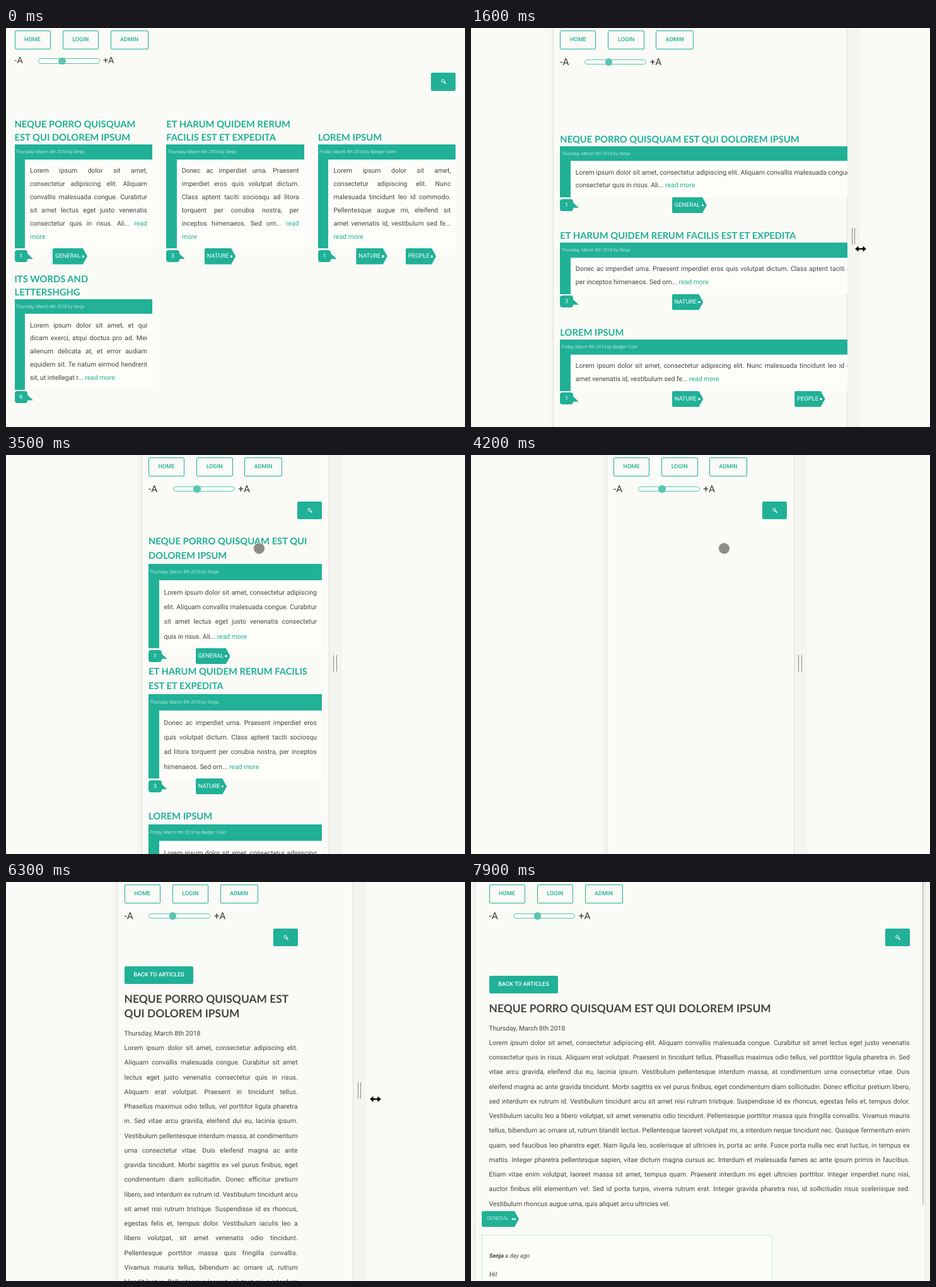
Recreate the animation shown at these times as an HTML page. Size 728 by 634 pixels, loop 8 s.

```html
<!DOCTYPE html>
<html lang="en">
<head>
<meta charset="utf-8">
<title>Responsive blog</title>
<style>
:root { --teal: #20b196; --bg: #fafaf6; --card: #fdfefa; }
html, body { margin: 0; width: 100%; height: 100%; overflow: hidden; background: var(--bg); }
#stage { position: relative; width: 728px; height: 634px; overflow: hidden; background: var(--bg);
  font: 10.49px Roboto, sans-serif; color: #444; text-rendering: geometricPrecision; }
#stage div, #stage svg { position: absolute; box-sizing: border-box; }
p, h1, h2 { margin: 0; }
.text { text-align: justify; }
.text span { color: var(--teal); }
h1, h2 { font-family: Lato, sans-serif; font-weight: 700; text-transform: uppercase; }
h2 { position: absolute; font-size: 14.75px; color: var(--teal); }
h1 { font-size: 17.4px; line-height: 23.25px; margin-bottom: 8.3px; }
.fill { background: var(--teal); }
.date { font-size: 7.32px; font-style: italic; font-weight: 300; color: #fff; padding-left: 2px; white-space: nowrap; }
.button { border: 1px solid var(--teal); border-radius: 2px; color: var(--teal);
  font-size: 9.1px; font-weight: 500; text-align: center; }
.button.fill { color: #fff; }
.label { color: #333; white-space: nowrap; line-height: 20px; }
.track { border: 1px solid #57c4b0; border-radius: 4px; background: var(--card); }
.thumb { border-radius: 50%; background: #5cc4b2; }
.bubble { border-radius: 4px; color: #fff; font-size: 9.2px; line-height: 19px; text-align: center; }
.tail { clip-path: polygon(0 0, 100% 100%, 0 100%); }
.tag { height: 25.5px; padding: 0 10.5px 0 4px; border-radius: 2px; background: var(--teal); color: #fff;
  font-size: 9.35px; line-height: 25.5px; white-space: nowrap;
  clip-path: polygon(0 0, calc(100% - 7px) 0, 100% 50%, calc(100% - 7px) 100%, 0 100%); }
.tag::after { content: ""; position: absolute; right: 4.8px; top: 11px; width: 3.6px; height: 3.6px;
  border-radius: 50%; background: #fff; }
#stage .post .tag { position: relative; display: block; width: 59px; margin-left: -11.5px;
  padding: 0 0 0 8px; font-size: 8.2px; font-weight: 300; }
.post .tag::after { box-shadow: -3.5px 0 #fff; }
.post { line-height: 23.25px; }
#stage .comment { position: relative; width: 460.5px; height: 130px; margin: 13px 0 0 -11.5px; padding: 20px 11px;
  border: 1px solid #c9e8e2; background: #fcfdf9; }
.comment p { margin-bottom: 5px; }
.comment i { font-size: 9.4px; }
.device { background: var(--bg); border: solid #dededb; border-width: 0 1px; box-shadow: 0 0 14px rgba(0, 0, 0, .06); }
.strip { background: #f4f4f0; }
.grip { border: solid #888; border-width: 0 1.5px; }
.touch { border: 1px solid #f0f0ee; border-radius: 50%; background: #8c8c89; }
</style>
</head>
<body>
<div id="stage"></div>
<script>
const LOOP = 8000, STEP = 100, H = 634, CENTER = 363.5;
const stage = document.getElementById('stage');

const LOREM = 'Lorem ipsum dolor sit amet, consectetur adipiscing elit. ';
const START = LOREM + 'Aliquam convallis malesuada congue. Curabitur sit amet lectus eget justo venenatis consectetur quis in risus. ';
const BODY = START + `Aliquam erat volutpat. Praesent in tincidunt tellus. Phasellus maximus odio tellus, vel porttitor
ligula pharetra in. Sed vitae arcu gravida, eleifend dui eu, lacinia ipsum. Vestibulum pellentesque interdum massa, at
condimentum urna consectetur vitae. Duis eleifend magna ac ante gravida tincidunt. Morbi sagittis ex vel purus finibus,
eget condimentum diam sollicitudin. Donec efficitur pretium libero, sed interdum ex rutrum id. Vestibulum tincidunt arcu
sit amet nisi rutrum tristique. Suspendisse id ex rhoncus, egestas felis et, tempus dolor. Vestibulum iaculis leo a
libero volutpat, sit amet venenatis odio tincidunt. Pellentesque porttitor massa quis fringilla convallis. Vivamus mauris
tellus, bibendum ac ornare ut, rutrum blandit lectus. Pellentesque laoreet volutpat mi, a interdum neque tincidunt nec.
Quisque fermentum enim quam, sed faucibus leo pharetra eget. Nam ligula leo, scelerisque at ultricies in, porta ac ante.
Fusce porta nulla nec erat luctus, in tempus ex mattis. Integer pharetra pellentesque sapien, vitae dictum magna cursus
ac. Interdum et malesuada fames ac ante ipsum primis in faucibus. Etiam vitae enim volutpat, laoreet massa sit amet,
tempus quam. Praesent interdum mi eget ultricies porttitor. Integer imperdiet nunc nisi, auctor finibus elit elementum
vel. Sed id porta turpis, viverra rutrum erat. Integer gravida pharetra nisi, id sollicitudin risus scelerisque sed.
Vestibulum rhoncus augue urna, quis aliquet arcu ultricies vel.`;

const TITLE = 'Neque porro quisquam est qui dolorem ipsum';
const THURSDAY = 'Thursday, March 8th 2018';
const CARDS = [
  { title: TITLE, by: THURSDAY + ' by Senja', count: 1, tags: ['GENERAL'], text: START + 'Ali...' },
  { title: 'Et harum quidem rerum facilis est et expedita', by: THURSDAY + ' by Senja', count: 3, tags: ['NATURE'],
    text: 'Donec ac imperdiet urna. Praesent imperdiet eros quis volutpat dictum. Class aptent taciti sociosqu ad litora torquent per conubia nostra, per inceptos himenaeos. Sed orn...' },
  { title: 'Lorem ipsum', by: 'Friday, March 9th 2018 by Badger Colin', count: 1, tags: ['NATURE', 'PEOPLE'],
    text: LOREM + 'Nunc malesuada tincidunt leo id commodo. Pellentesque augue mi, eleifend sit amet venenatis id, vestibulum sed fe...' },
  { title: 'Its words and lettershghg', by: THURSDAY + ' by Senja', count: 6, tags: [],
    text: 'Lorem ipsum dolor sit amet, et qui dicam exerci, atqui doctus pro ad. Mei alienum delicata at, et error audiam equidem sit. Te natum eirmod hendrerit sit, ut intellegat r...' }
];

const box = (x, y, w, h, cls, html = '', css = '') =>
  `<div class="${cls}" style="left:${x}px;top:${y}px;width:${w}px;height:${h}px;${css}">${html}</div>`;

const button = (x, y, w, h, text, cls = '') =>
  box(x, y, w, h, 'button ' + cls, text, `line-height:${h - 2}px`);

// Value at time t on a path of [time, value] points
function along(points, t) {
  if (t <= points[0][0]) return points[0][1];
  for (let i = 1; i < points.length; i++) {
    const [a, u] = points[i - 1], [b, v] = points[i];
    if (t <= b) return u + (v - u) * (t - a) / (b - a);
  }
  return points[points.length - 1][1];
}

function header(x, w, wide) {
  const y = wide ? 52.5 : 54, track = x + (wide ? 37 : 38.7), size = `font-size:${wide ? 14.2 : 15.2}px`;
  const icon = `<svg width="9" height="9" style="left:15px;top:9px" fill="none" stroke="#fff">
    <circle cx="3" cy="3" r="2.2"/><path d="M4.7 4.7 7.6 7.6" stroke-width="1.6"/></svg>`;
  return button(x, 4, 57, 30, 'HOME') + button(x + 76, 4, 57.5, 30, 'LOGIN') + button(x + 152, 4, 60, 30, 'ADMIN')
    + box(x, y - 10.3, 20, 20, 'label', '-A', size)
    + box(track, y - 4.3, 98, 8.6, 'track')
    + box(track + 32.7, y - 5.6, 11.4, 11.4, 'thumb')
    + box(x + (wide ? 140.5 : 142.3), y - 10.3, 20, 20, 'label', '+A', size)
    + button(x + w - 39, wide ? 71 : 73.5, 39, 28.5, icon, 'fill');
}

function card(c, x, y, w, lines, pitch, barH, pad) {
  const body = lines * pitch + pad, end = y + barH + body;
  const tags = c.tags.map((name, i) => {
    const left = x + 5.5 + .2515 * w + i * (24.1 + .249 * w);
    return `<div class="tag" style="left:${left}px;top:${end}px">${name}</div>`;
  });
  return `<h2 style="left:${x}px;width:${w}px;bottom:${H - y}px;line-height:${pitch > 22 ? 23.25 : 21}px">${c.title}</h2>`
    + box(x, y, w, barH, 'fill date', c.by, `line-height:${barH}px`)
    + box(x, y + barH - .5, 16.5, body + .5, 'fill')
    + box(x + 16.5, y + barH, w - 16.5, body, '', '', 'background:var(--card)')
    + box(x + 24.5, y + barH + pad / 2 + .5, w - 32.5, body, 'text', c.text + ' <span>read more</span>', `line-height:${pitch}px`)
    + box(x, end + 2.7, 20.5, 19, 'fill bubble', c.count)
    + box(x + 20, end + 8, 9.5, 9, 'fill tail')
    + tags.join('');
}

function list(x, w, lines) {
  const small = lines === 2, pitch = small ? 20.92 : 23.25, barH = small ? 23.5 : 26.2, pad = small ? 16 : 15.2;
  const period = barH + lines * pitch + pad + 72.6;
  return CARDS.slice(0, 3).map((c, i) =>
    card(c, x, (small ? 187.5 : 172.5) + i * period, w, lines, pitch, barH, pad)).join('');
}

const grid = () => CARDS.map((c, i) =>
  card(c, 13.5 + i % 3 * 240.7, i < 3 ? 185 : 430.5, 218.5, i < 3 ? 6 : 5, 20.92, 23.5, 16)).join('');

const post = (x, w, y) => button(x + .5, y, 109, 28, 'BACK TO ARTICLES', 'fill')
  + box(x, y + 40, w, 700, 'post', `<h1>${TITLE}</h1><p>${THURSDAY}</p><p class="text">${BODY}</p>
    <div class="tag">GENERAL</div>
    <div class="comment"><p><i><b>Senja</b> a day ago</i></p><p>Hi!</p></div>`);

// Half of the device width, and the pointer's path
const HALF = [[500, 357.5], [900, 294], [1200, 276], [1500, 276], [1800, 149], [6200, 149],
  [6700, 341], [6800, 341], [6900, 351.5], [7100, 357.5]];
const POINTER_X = [[500, 742], [900, 673], [1200, 660], [1500, 660], [1800, 534], [2900, 534],
  [3500, 401], [5400, 401], [5800, 543], [6200, 543], [6700, 760]];
const POINTER_Y = [[2900, 350.5], [3500, 148.5], [5400, 148.5], [5800, 345]];

// Page layouts: until, margin, content width, lines per card (0 = single post)
const LAYOUTS = [[1600, 26, 684, 2], [2100, 11.5, 684, 2], [2300, 11.5, 404, 3], [4400, 11.5, 275, 4],
  [6500, 11.5, 275, 0], [7300, 11.5, 475, 0], [LOOP, 22.5, 667.5, 0]];

function pointer(t) {
  const x = along(POINTER_X, t), y = along(POINTER_Y, t);
  if (x < 513) return box(x - 9.5, y - 9.5, 19, 19, 'touch');
  return `<svg width="22" height="14" style="left:${x - 11}px;top:${y - 7}px">
    <path d="M1.5 7 8 1.5V5.3h6V1.5L20.5 7 14 12.5V8.7H8v3.8z" fill="#000" stroke="#fff"/></svg>`;
}

function scrollbar(t, right) {
  const first = t >= 2300 && t < 2800, last = t >= 7600;
  if (!first && !last) return '';
  const alpha = first ? (t < 2600 ? 1 : .5) : (t < 7700 ? .5 : t < 7900 ? 1 : .8);
  return box(right - 5, 0, 2, first ? 447 : 513, '', '', `background:#b8b8b5;opacity:${alpha}`);
}

function scene(t) {
  if (t < 500) return header(13.5, 699.5, true) + grid();
  const half = along(HALF, t), left = CENTER - half, right = CENTER + half;
  const [, x, w, lines] = LAYOUTS.find(l => t < l[0]);
  const fade = lines ? along([[3900, 1], [4200, 0]], t) : along([[4300, 0], [4800, 1]], t);
  const painted = t < 1600 ? 2 * half - 3 : t >= 6300 && t < 6500 ? 298 : t >= 6500 && t < 7600 ? 367 : 2 * half;
  const content = lines ? list(x, w, lines) : post(x, w, t < 7300 ? 134 : 149);
  const page = header(x, w, false) + box(0, 0, painted, H, '', content, `opacity:${fade}`);
  return box(left, -20, 2 * half, H + 40, 'device')
    + box(right, 0, 20, H, 'strip')
    + box(right + 6.7, 318, 5.6, 26, 'grip')
    + box(left, 0, painted, H, '', page, 'overflow:hidden')
    + scrollbar(t, right) + pointer(t);
}

let shown = -1;
function draw(now) {
  const t = Math.floor(now % LOOP / STEP) * STEP;
  if (t !== shown) stage.innerHTML = scene(shown = t);
  requestAnimationFrame(draw);
}
draw(performance.now());
</script>
</body>
</html>
```
